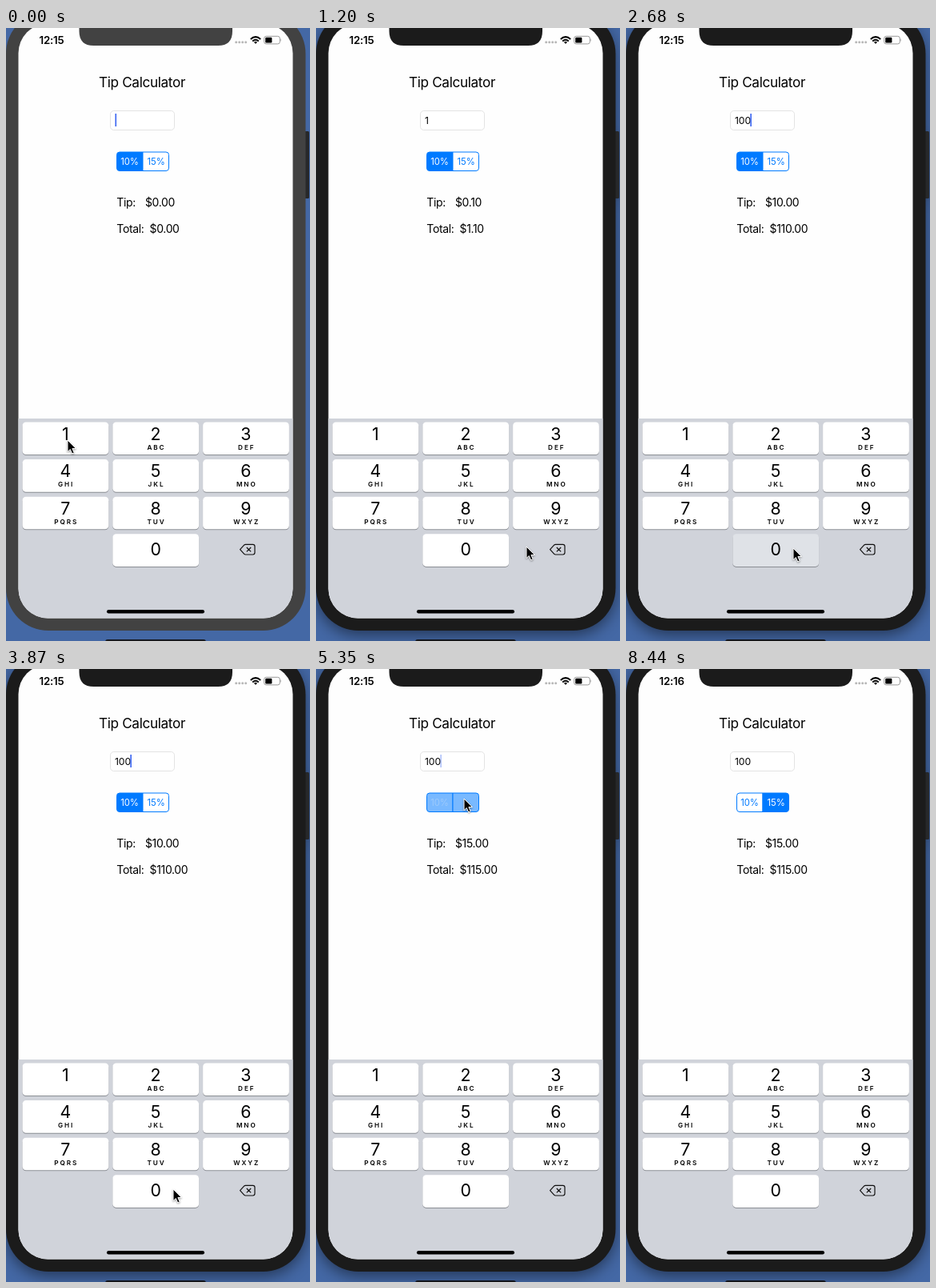
Recreate the animation shown at these times as an HTML page. Size 380x766 px, loop 8.54 s.

```html
<!DOCTYPE html>
<html lang="en">
<head>
<meta charset="utf-8">
<title>Tip Calculator</title>
<style>
  html, body { margin: 0; width: 100%; height: 100%; overflow: hidden; background: #4468a5; }
  svg { display: block; width: 380px; height: 766px; }
  text { font-family: Inter, "Liberation Sans", sans-serif; white-space: pre; }
  .title { font-size: 17.2px; letter-spacing: -.35px; text-anchor: middle; }
  .clock { font-size: 13.3px; font-weight: 600; letter-spacing: -.2px; }
  .label { font-size: 14px; letter-spacing: -.36px; }
  .field { font-size: 12.2px; letter-spacing: -.1px; }
  .seg { font-size: 11.3px; letter-spacing: -.1px; text-anchor: middle; }
  .digit { font-size: 21.3px; text-anchor: middle; }
  .letters { font-size: 8.2px; font-weight: 600; letter-spacing: 1.9px; text-anchor: middle; }
  .active { filter: drop-shadow(0 6px 9px rgba(0, 0, 0, .45)); }
</style>
</head>
<body>
<svg viewBox="0 0 380 766">
  <defs>
    <clipPath id="screen"><rect x="15.5" y="-5.5" width="343" height="743" rx="37"/></clipPath>
  </defs>
  <rect width="380" height="766" fill="#4468a5"/>
  <rect x="124" y="764" width="126" height="8" rx="3" fill="#16191f"/>
  <g id="body">
    <rect x="370" y="129" width="9" height="84" rx="1.5" fill="#27282a"/>
    <rect x="0" y="-21" width="374.5" height="774" rx="53"/>
  </g>

  <g clip-path="url(#screen)">
    <rect width="380" height="766" fill="#fefefe"/>
    <rect y="488" width="380" height="278" fill="#d0d3da"/>
    <g id="keys"></g>
  </g>
  <path id="notch" d="M85 -6Q91.5 -6 91.5 1V4Q91.5 22 109.5 22H265Q283 22 283 4V1Q283 -6 289.5 -6Z"/>
  <rect x="126" y="727" width="122" height="4.5" rx="2.25"/>

  <!-- status bar -->
  <text class="clock" id="clock" x="41.5" y="20"></text>
  <g fill="#b8b8b8">
    <circle cx="287.7" cy="17.7" r="1.5"/><circle cx="291.7" cy="17.7" r="1.5"/>
    <circle cx="295.7" cy="17.7" r="1.5"/><circle cx="299.7" cy="17.7" r="1.5"/>
  </g>
  <g fill="none" stroke="#000" stroke-width="2">
    <path d="M305.8 13.9Q312 8.3 318.2 13.9M308.2 16.4Q312 13 315.8 16.4"/>
    <path d="M310 17.5Q312 16 314 17.5L312 20Z" fill="#000" stroke="none"/>
  </g>
  <rect x="322.7" y="10.3" width="19.6" height="9.6" rx="2.6" fill="none" stroke="#999"/>
  <rect x="324.2" y="11.8" width="8.2" height="6.6" rx="1.2"/>
  <path d="M343.4 13.3Q345 15.1 343.4 16.9Z" fill="#999"/>

  <!-- form -->
  <text class="title" x="170" y="73.6">Tip Calculator</text>
  <rect x="130.5" y="103.5" width="80" height="24" rx="4.2" fill="#fff" stroke="#e3e3e3"/>
  <text class="field" id="bill" x="136" y="119.6"></text>
  <rect id="caret" y="107" width="1.7" height="16" fill="#426bf2"/>
  <path id="left" d="M171 155H142Q138.5 155 138.5 158.5V175Q138.5 178.5 142 178.5H171Z" stroke="#007aff"/>
  <path id="right" d="M171 155H200Q203.5 155 203.5 158.5V175Q203.5 178.5 200 178.5H171Z" stroke="#007aff"/>
  <text class="seg" id="ten" x="154.5" y="170.8">10%</text>
  <text class="seg" id="fifteen" x="187.6" y="170.8">15%</text>
  <text class="label" x="138.3" y="223">Tip:</text>
  <text class="label" id="tip" x="174" y="223"></text>
  <text class="label" x="138.3" y="256">Total:</text>
  <text class="label" id="total" x="179.6" y="255.6"></text>

  <path d="M292.6 651.7L297.6 646.2Q298.3 645.4 299.4 645.4H308.6Q311 645.4 311 647.8V655.6Q311 658 308.6 658H299.4Q298.3 658 297.6 657.2ZM300.8 649L306.2 654.4M306.2 649L300.8 654.4"
    fill="none" stroke="#111" stroke-width="1.2" stroke-linejoin="round"/>

  <g id="cursor" style="filter:drop-shadow(0 1px 1px rgba(0,0,0,.4))">
    <path d="M0 0V14.6L3.3 11.5L5.7 17L8.2 15.9L5.9 10.5H10.4Z" stroke="#fff" stroke-width="1"/>
  </g>
</svg>

<script>
const LOOP = 8540, TICK = 148.05;
const $ = id => document.getElementById(id);
const fill = (id, color) => $(id).setAttribute('fill', color);
const money = value => '$' + value.toFixed(2);

const groups = ['', 'ABC', 'DEF', 'GHI', 'JKL', 'MNO', 'PQRS', 'TUV', 'WXYZ'];
function key(digit, letters, col, row) {
  const x = 20.5 + 112.8 * col, y = 492.5 + 46.6 * row, mid = x + 53.8;
  const box = `x="${x}" width="107.8" height="40.6" rx="4.5"`;
  return `<rect ${box} y="${y + 1}" fill="#8b8e94"/>
    <rect ${box} y="${y}" id="key${digit}" fill="#fff"/>
    <text class="digit" x="${mid}" y="${y + (digit ? 22.1 : 27)}">${digit}</text>
    <text class="letters" x="${mid + 0.9}" y="${y + 34}">${letters}</text>`;
}
$('keys').innerHTML =
  groups.map((letters, i) => key(i + 1, letters, i % 3, Math.floor(i / 3))).join('') + key(0, '', 1, 3);

// Pointer moves: first tick, last tick, start, control, end
const moves = [
  [5, 8, 77, 515, 170, 610, 263, 648],
  [8, 11, 263, 648, 236, 650, 209, 650],
  [27, 35, 209, 650, 261, 480, 185, 162],
  [38, 46, 185, 162, 275, 330, 337, 543],
  [46, 50, 337, 543, 345, 620, 362, 790]
];

function pointer(n) {
  const [from, to, x0, y0, x1, y1, x2, y2] = moves.findLast(m => n >= m[0]) || moves[0];
  const p = Math.min(1, Math.max(0, (n - from) / (to - from)));
  const s = p * p * (3 - 2 * p);
  const curve = (a, b, c) => a * (1 - s) ** 2 + 2 * b * s * (1 - s) + c * s * s;
  return [curve(x0, x1, x2), curve(y0, y1, y2)];
}

function caretOpacity(n) {
  const start = n < 13 ? 7 : 23;
  if (n < start) return 1;
  const phase = (n - start) % 6.5;
  return phase < 1 ? 0.4 : phase < 3 ? 0 : 1;
}

function draw(t) {
  const n = Math.floor(t / TICK);
  const bill = n < 2 ? '' : n < 13 ? '1' : n < 18 ? '10' : '100';
  const rate = n < 36 ? 0.1 : 0.15;
  const shell = n < 1 ? '#424242' : '#1b1b1b';

  fill('body', shell);
  fill('notch', shell);
  $('body').classList.toggle('active', n > 0);
  $('clock').textContent = n < 37 ? '12:15' : '12:16';

  $('bill').textContent = bill;
  $('tip').textContent = money(bill * rate);
  $('total').textContent = money(bill * (1 + rate));
  $('caret').setAttribute('x', 136.4 + 6.3 * bill.length);
  $('caret').setAttribute('opacity', caretOpacity(n));

  fill('key1', n === 1 ? '#b9bec8' : '#fff');
  fill('key0', n === 12 || n === 17 ? '#b9bec8' : n === 18 ? '#dfe2e7' : '#fff');

  const [on, off, pale] = ['#007aff', '#fff', '#79b9ff'];
  const fading = n === 36, first = n < 36;
  fill('left', fading ? pale : first ? on : off);
  fill('right', fading ? pale : first ? off : on);
  fill('ten', fading ? '#9cc9fb' : first ? off : on);
  fill('fifteen', fading ? pale : first ? on : off);

  $('cursor').setAttribute('transform', `translate(${pointer(n)})`);
}

const begin = performance.now();
function frame() {
  draw((performance.now() - begin) % LOOP);
  requestAnimationFrame(frame);
}
frame();
</script>
</body>
</html>
```
